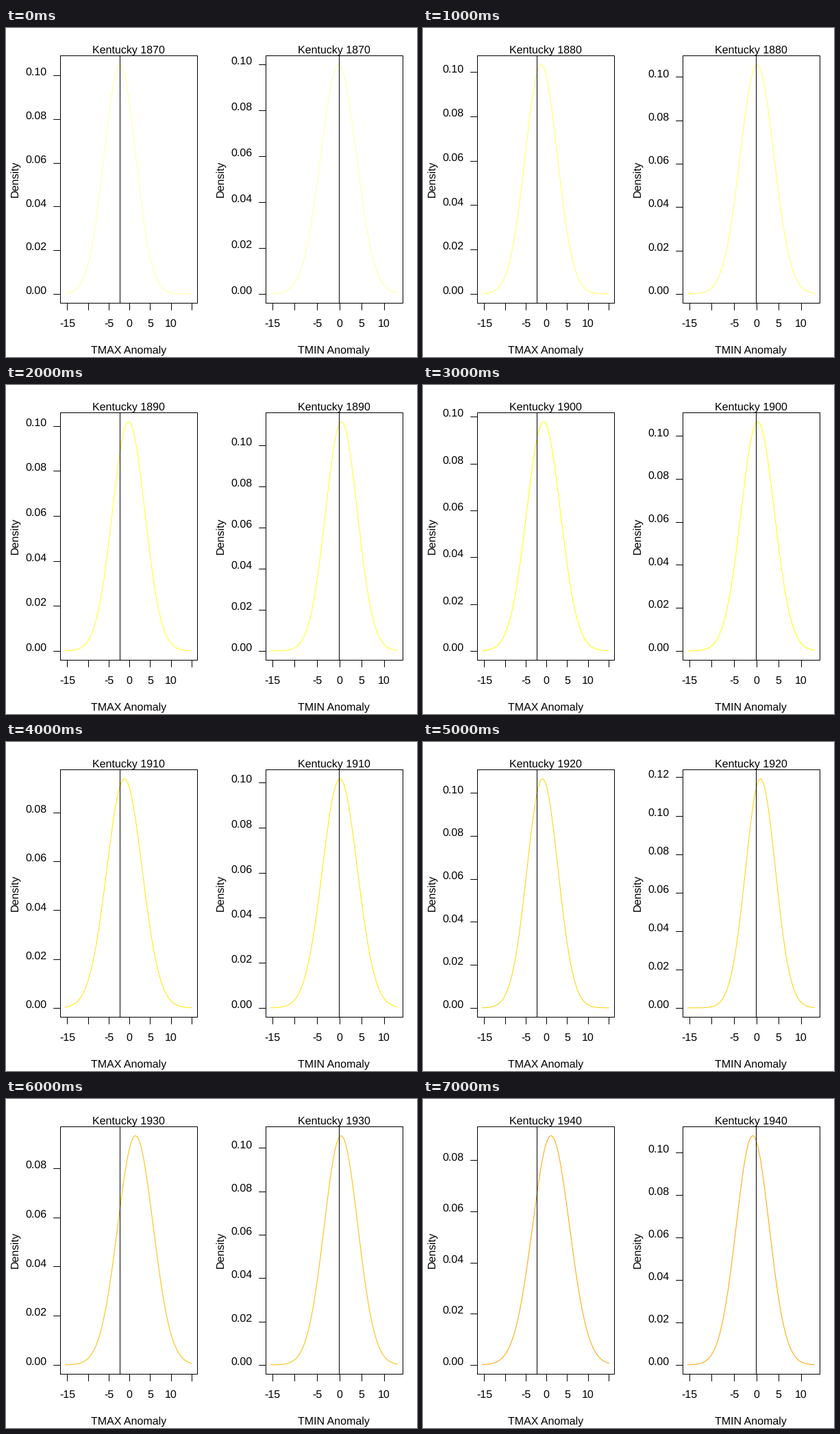
Write a matplotlib script that moves like this. It is 600 px wide and 480 px high and loops after 8000 ms.

```python
import matplotlib.pyplot as plt
import numpy as np
from matplotlib.animation import FuncAnimation

W, H, DPI = 600, 480, 96
LINE = 19.2                        # one margin line in pixels
TOP, BOTTOM = 2.1 * LINE, H - 4.1 * LINE
LEFT, RIGHT = 4.1 * LINE, W / 2 - 1.1 * LINE
INNER = (BOTTOM - TOP) / 1.08      # plot height without its 4% padding
BASE = BOTTOM - 0.04 * INNER
FIRST_YEAR = 1870

# One (mean, peak density) pair per decade.
TMAX = [(-2.3, .10485), (-1.25, .1033), (-.2, .1018), (-.7, .0978),
        (-1.2, .0938), (-.95, .1066), (1.45, .0932), (1.1, .0896)]
TMIN = [(-.15, .0997), (.18, .1056), (.5, .11155), (.33, .1066),
        (.15, .1016), (.95, .1192), (.4, .1056), (-.8, .1078)]

# name, offset, x limits, marked value, tick values, labelled ticks, decades
PANELS = [
    ("TMAX", 0, (-15.55, 15.08), -2.3, range(-15, 16, 5), (-15, -5, 0, 5, 10), TMAX),
    ("TMIN", 300, (-15.44, 13.07), -.12, range(-15, 11, 5), (-15, -5, 0, 5, 10), TMIN),
]

plt.rcParams.update({"font.family": "Liberation Sans", "font.size": 12,
                     "text.hinting": "none", "text.hinting_factor": 1})
fig = plt.figure(figsize=(W / DPI, H / DPI), dpi=DPI, facecolor="white")
ax = fig.add_axes([0, 0, 1, 1])


def line(x, y, color="black"):
    ax.plot(x, y, color=color, lw=0.75, solid_capstyle="round",
            solid_joinstyle="round")


def label(x, y, text, ha="center", **kw):
    ax.text(x, y, text, ha=ha, va="baseline", **kw)


def heat(k):
    """Pale yellow, through yellow, towards red."""
    if k < 3:
        return 1, 1, 0.625 - 0.25 * k
    return 1, 1 - (k - 3) / 11, 0


def draw_panel(k, name, dx, limits, mark, ticks, labelled, decades):
    left, right = LEFT + dx, RIGHT + dx
    mid = (left + right) / 2
    low, high = limits
    pad = (right - left) * 0.04 / 1.08
    mean, peak = decades[k]

    def px(v):
        return left + pad + (v - low) / (high - low) * (right - left - 2 * pad)

    def py(d):
        return BASE - d / peak * INNER

    v = np.linspace(low, high, 240)
    density = peak * np.exp(-np.pi * (peak * (v - mean)) ** 2)
    line(px(v), py(density), heat(k))

    line([left, right, right, left, left], [BOTTOM, BOTTOM, TOP, TOP, BOTTOM])
    for t in ticks:
        line([px(t)] * 2, [BOTTOM, BOTTOM + LINE / 2])
        if t in labelled:
            label(px(t), BOTTOM + 1.8 * LINE, str(t))
    for i in range(int(1.04 * peak / 0.02) + 1):
        y = py(0.02 * i)
        line([left - LINE / 2, left], [y, y])
        label(left - LINE, y, f"{0.02 * i:.2f}", ha="right")

    line([px(mark)] * 2, [TOP, BOTTOM])
    label(mid, TOP - 0.2 * LINE, f"Kentucky {FIRST_YEAR + 10 * k}")
    label(mid, BOTTOM + 3.8 * LINE, f"{name} Anomaly")
    label(left - 3.2 * LINE, (TOP + BOTTOM) / 2, "Density",
          rotation=90, rotation_mode="anchor")


def update(k):
    ax.clear()
    ax.axis("off")
    ax.set(xlim=(0, W), ylim=(H, 0))
    for panel in PANELS:
        draw_panel(k, *panel)
    return []


anim = FuncAnimation(fig, update, frames=len(TMAX), interval=1000,
                     init_func=lambda: [], repeat=True, repeat_delay=0)
plt.show()
```
